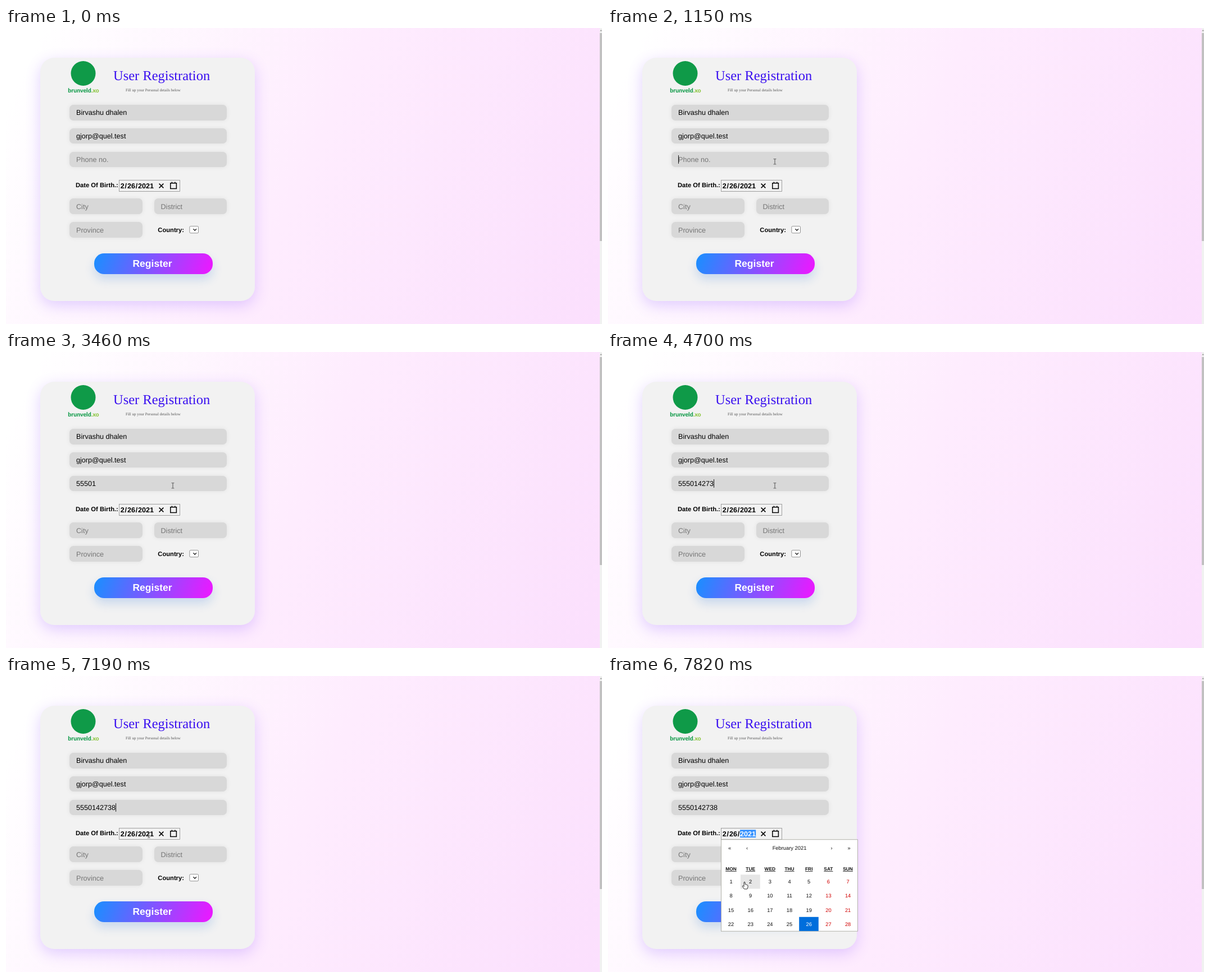
Recreate the animation shown at these times as an HTML page. Size 1061 by 528 pixels, loop 8000 ms.

```html
<!DOCTYPE html>
<html lang="en">
<head>
<meta charset="utf-8">
<title>User Registration</title>
<style>
html, body { margin: 0; width: 100%; height: 100%; overflow: hidden; }
body { position: relative; background: linear-gradient(115deg, #fff 5%, #feecfe 50%, #fbdffd 100%); }
div, svg { position: absolute; }
svg { left: 0; top: 0; }
.card { left: 61px; top: 53px; width: 382px; height: 434px; border-radius: 25px;
  background: #f2f2f2; box-shadow: 0 8px 26px rgba(130, 70, 255, .24); }
.field { height: 27.6px; border-radius: 7px; background: #d8d8d8; box-shadow: 0 0 8px rgba(0, 0, 0, .07); }
.button { left: 157px; top: 402px; width: 211px; height: 37px; border-radius: 17.5px;
  background: linear-gradient(110deg, #1890ff, #f016ff); box-shadow: 0 9px 18px rgba(30, 110, 220, .2); }
.bar { left: 1056.5px; top: 0; width: 4.5px; height: 528px; background: #f1f1f1; }
.thumb { left: 1057px; top: 9px; width: 4px; height: 371px; background: #c1c1c1; }
text { font-family: "Liberation Sans", Arial, sans-serif; font-size: 12.6px; white-space: pre;
  text-rendering: geometricPrecision; }
.serif { font-family: "Liberation Serif", "Times New Roman", serif; }
.hint { fill: #757575; }
.bold { font-weight: bold; }
.label { font-weight: bold; font-size: 11.2px; }
.mid { text-anchor: middle; }
.cal text { font-size: 9.33px; text-anchor: middle; fill: #111; }
.cal .week { font-size: 8.4px; font-weight: bold; }
.cal .end { fill: #d10000; }
.cal .active { fill: #fff; }
</style>
</head>
<body>
<div class="card"></div>
<div class="button"></div>
<div class="bar"></div>
<div class="thumb"></div>
<svg id="stage" width="1061" height="528" viewBox="0 0 1061 528">
  <path d="M1057.3 5.5L1059.2 3L1061 5.5Z" fill="#999"/>

  <circle cx="137.5" cy="81" r="22" fill="#0f9a48"/>
  <text class="mid" x="138" y="114.5" fill="#0f9a48" style="font:800 10.5px Lato,sans-serif">brunveld<tspan fill="#8cc63f">.xo</tspan></text>
  <text class="serif" x="191" y="93" fill="#3a10f0" style="font-size:24.5px">User Registration</text>
  <text class="serif" x="213" y="113" fill="#555" style="font-size:7px">Fill up your Personal details below</text>

  <text x="125" y="155">Birvashu dhalen</text>
  <text x="125" y="197">gjorp@quel.test</text>
  <text id="phone" x="125" y="239"></text>
  <rect id="caret" y="227" width=".9" height="15"/>
  <text class="hint" x="125" y="322.5">City</text>
  <text class="hint" x="275.5" y="322.5">District</text>
  <text class="hint" x="125" y="364.5">Province</text>
  <text class="label" x="124" y="283.5">Date Of Birth.:</text>
  <text class="label" x="270.3" y="364">Country:</text>

  <rect x="201.4" y="271.4" width="108.2" height="20" fill="none" stroke="#8a8a8a" stroke-width=".8"/>
  <rect id="mark" x="235" y="274.3" width="28.2" height="13.8" fill="#3390ff"/>
  <g class="bold">
    <text x="203.7" y="285.5">2</text>
    <text x="211.6" y="285.5">/</text>
    <text x="215.9" y="285.5">26</text>
    <text x="230.8" y="285.5">/</text>
    <text id="year" x="235" y="285.5">2021</text>
  </g>
  <g fill="none" stroke="#000" stroke-width="1.5">
    <path d="M272.6 277.6l7.8 7.8m0-7.8l-7.8 7.8"/>
    <path d="M292.8 276.8h10.6v9.8h-10.6zM295.4 274.4v2.4M300.8 274.4v2.4"/>
  </g>

  <rect x="326.9" y="353.6" width="15.6" height="12.2" rx="1.8" fill="#fff" stroke="#767676" stroke-width=".8"/>
  <path d="M333.4 358.4l2.8 2.8l2.8-2.8" fill="none" stroke="#000" stroke-width="1.3"/>

  <text class="bold mid" x="260.5" y="426" fill="#fff" style="font-size:17.5px">Register</text>

  <g id="cal" class="cal">
    <rect x="201.4" y="291.8" width="243.2" height="163.4" fill="#fff" stroke="#a0a096" stroke-width=".8"/>
    <rect id="hover" x="236" y="354.3" width="34.7" height="25.2" fill="#e6e6e6"/>
    <rect x="340.2" y="429.8" width="34.6" height="25.1" fill="#006edc"/>
    <text x="216.5" y="310.3">«</text>
    <text x="247.5" y="310.3">‹</text>
    <text x="323" y="310.3">February 2021</text>
    <text x="398" y="310.3">›</text>
    <text x="429" y="310.3">»</text>
  </g>

  <g id="cursor">
    <path id="arrow" d="M0 0V10.5L2.4 8.2L4 12L5.6 11.3L4 7.6H7Z" fill="#fff" stroke="#000" stroke-width=".8"/>
    <path id="beam" d="M-2.3-4.7H-.6L0-4.2L.6-4.7H2.3M0-4.2V4.2M-2.3 4.7H-.6L0 4.2L.6 4.7H2.3" fill="none" stroke="#444" stroke-width=".9"/>
    <path id="hand" d="M-1 1Q0-.6 1 1V4.6Q2.6 4 3 5.2Q4.4 4.8 4.6 6Q6 5.8 6 7.2V9.5L4.8 13H-.4L-3.6 8.6Q-4 7-2.4 7.2L-1 8.6Z" fill="#fff" stroke="#000" stroke-width=".8"/>
  </g>
</svg>
<script>
const LOOP = 8000, NUMBER = "5550142738", CAL_OPEN = 7270, HOVER = 7820;
const $ = id => document.getElementById(id);
const show = (el, on) => { el.style.display = on ? "" : "none"; };

function field(x, y, w) {
  const el = document.createElement("div");
  el.className = "field";
  el.style.cssText = `left:${x}px;top:${y}px;width:${w}px`;
  document.body.insertBefore(el, $("stage"));
}
[137, 178.8, 220.6].forEach(y => field(113.3, y, 279.4));
field(113.3, 304.4, 129.5);
field(263.7, 304.4, 129);
field(113.3, 346.2, 129.5);

function calText(str, col, y, cls) {
  const el = document.createElementNS("http://www.w3.org/2000/svg", "text");
  el.setAttribute("x", 219 + col * 34.68);
  el.setAttribute("y", y);
  el.setAttribute("class", cls);
  el.textContent = str;
  $("cal").append(el);
  return el;
}
["MON", "TUE", "WED", "THU", "FRI", "SAT", "SUN"].forEach((day, i) => {
  calText(day, i, 347, "week").style.textDecoration = "underline dotted";
});
for (let d = 0; d < 28; d++) {
  const col = d % 7;
  calText(d + 1, col, 370.3 + Math.floor(d / 7) * 25.1, d === 25 ? "active" : col > 4 ? "end" : "");
}

// Time, typed digits, caret shown
const typing = [
  [0, 0, 0], [1010, 0, 1], [1530, 0, 0], [1990, 0, 1], [2070, 1, 1], [2150, 2, 1],
  [2530, 3, 1], [2700, 4, 1], [2930, 5, 1], [3460, 5, 0], [4010, 5, 1], [4100, 6, 1],
  [4240, 7, 1], [4470, 8, 1], [4700, 9, 1], [4950, 10, 1], [5480, 10, 0], [6030, 10, 1],
  [6570, 10, 0], [7040, 10, 1], [CAL_OPEN, 10, 0]
];

// Time, pointer, x, y
const sweep = Array.from({ length: 11 }, (_, k) => {
  const u = k / 10, e = u * u * (3 - 2 * u);
  const x = 956 - 654 * e, y = 489 - 262 * e;
  return [70 + 77 * k, x < 354 ? "beam" : "arrow", x, y];
});
const moves = [
  [0, "", 0, 0], ...sweep,
  [940, "beam", 310, 223], [1010, "beam", 302, 232], [1080, "beam", 298, 237], [1150, "beam", 297, 238.3],
  [6030, "arrow", 276, 249.6], [6110, "arrow", 274, 262], [6190, "arrow", 275, 272],
  [6260, "arrow", 277, 280], [6340, "arrow", 278, 285], [6420, "arrow", 278, 287],
  [6570, "arrow", 277, 289], [6650, "arrow", 275, 289], [6720, "arrow", 273, 288],
  [6890, "arrow", 270, 287], [6960, "beam", 261, 286], [7040, "beam", 257, 285],
  [7190, "beam", 254.3, 284],
  [7670, "arrow", 247, 308], [7745, "arrow", 234, 338], [HOVER, "hand", 243, 367]
];

const at = (table, t) => table.findLast(row => row[0] <= t);

function draw(t) {
  const [, count, caretOn] = at(typing, t);
  const phone = $("phone");
  phone.textContent = count ? NUMBER.slice(0, count) : "Phone no.";
  phone.setAttribute("class", count ? "" : "hint");
  $("caret").setAttribute("x", 125.1 + count * 7.007);
  show($("caret"), caretOn);

  const open = t >= CAL_OPEN;
  show($("cal"), open);
  show($("mark"), open);
  $("year").setAttribute("fill", open ? "#fff" : "#000");
  show($("hover"), t >= HOVER);

  const [, kind, x, y] = at(moves, t);
  for (const id of ["arrow", "beam", "hand"]) show($(id), id === kind);
  $("cursor").setAttribute("transform", `translate(${x} ${y})`);
}

const start = performance.now();
function tick() {
  draw((performance.now() - start) % LOOP);
  requestAnimationFrame(tick);
}
tick();
</script>
</body>
</html>
```
